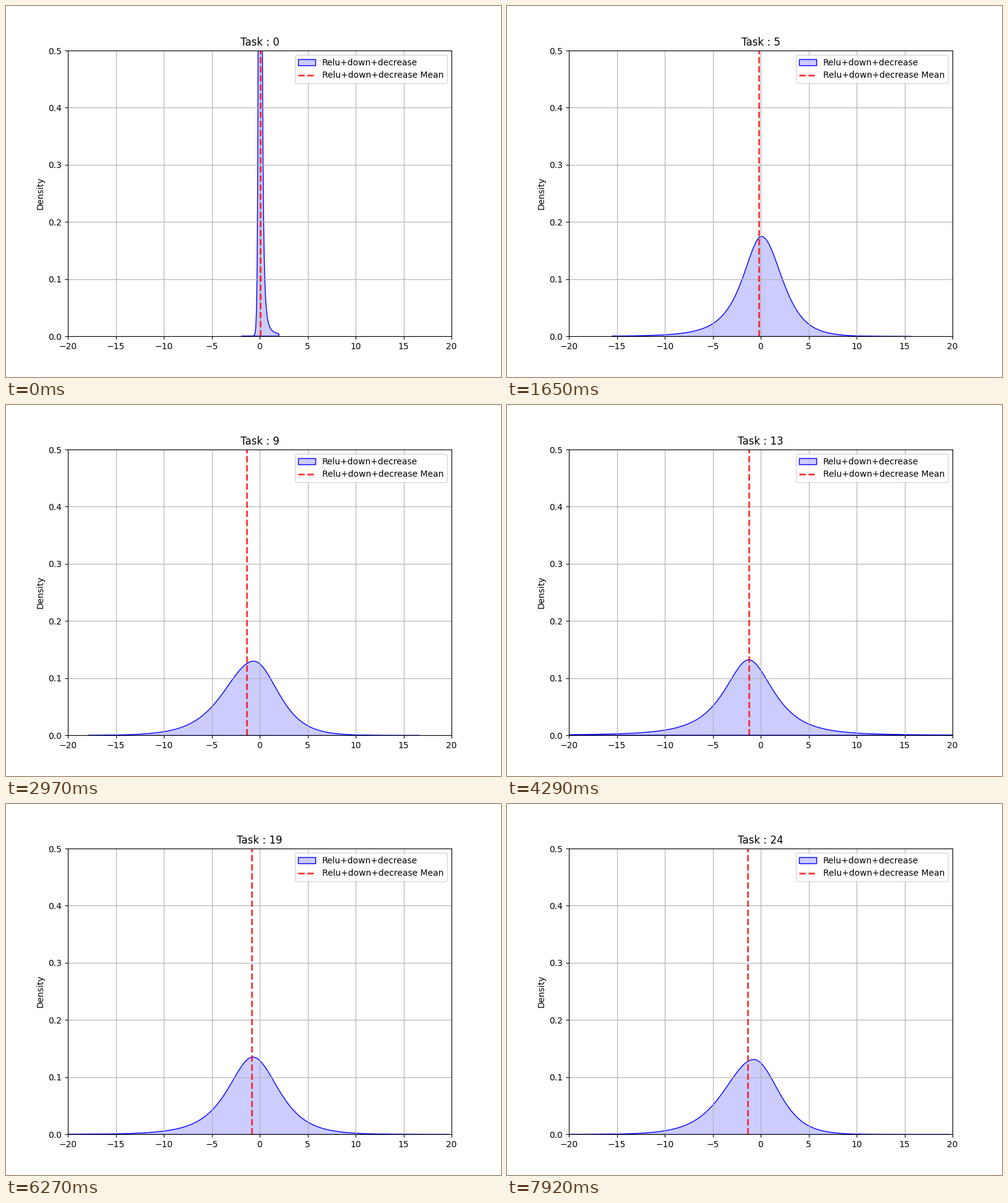
Animation, 800 px wide and 600 px high, one loop 8000 ms. Source, as a matplotlib script:

```python
import numpy as np
import matplotlib.pyplot as plt
from matplotlib.animation import FuncAnimation

LOOP, STEP, HOLD = 8000, 40, 330  # ms
TASKS = 25

# Key shapes by task: mean, mode, 1 / peak height, then width and tail growth
# of the left and the right side, then how far the curve is drawn from its mode.
KEYS = {
    0: (.07, .05, .33, .14, 0, .108, .195, 1.95),
    5: (-.18, .05, 5.71, 2.3, .14, 2.72, .035, 15.6),
    9: (-1.33, -.65, 7.69, 4.0, .035, 3.28, .015, 17.3),
    13: (-1.22, -1.25, 7.58, 2.97, .155, 3.05, .135, 27),
    17: (-1.08, -.65, 6.97, 3.3, .09, 3.3, -.01, 20.5),
    19: (-.83, -.75, 7.38, 3.14, .108, 3.35, .055, 20.5),
    24: (-1.33, -.75, 7.62, 3.95, .033, 3.35, -.01, 20.5),
}


def shape(task):
    """Blend the neighbouring key shapes."""
    return [np.interp(task, list(KEYS), column) for column in zip(*KEYS.values())]


def outline(task):
    """Two-sided sech-squared bell, closed along the baseline."""
    _, mode, flat, left, left_tail, right, right_tail, reach = shape(task)
    d = np.linspace(-reach, reach, 400)
    dist = np.abs(d)
    width = np.where(d < 0, left + left_tail * dist, right + right_tail * dist)
    y = 1 / (flat * np.cosh(dist / width) ** 2)
    x = mode + d
    return np.vstack([[x[0], 0], np.column_stack([x, y]), [x[-1], 0]])


outlines = [outline(k) for k in range(TASKS)]
means = [shape(k)[0] for k in range(TASKS)]

fig, ax = plt.subplots(figsize=(8, 6), dpi=100)
area = ax.fill_between(*outlines[0].T, facecolor=(0, 0, 1, .2), edgecolor=(0, 0, 1, 1),
                       linewidth=1, label="Relu+down+decrease")
mean = ax.axvline(means[0], color="red", alpha=.8, linestyle="--", linewidth=2,
                  label="Relu+down+decrease Mean")
ax.set_xlim(-20, 20)
ax.set_ylim(0, .5)
ax.set_ylabel("Density")
ax.grid(True)
ax.legend(loc="upper right")
title = ax.set_title("Task : 0")


def update(frame):
    task = min((frame * STEP + STEP - 1) // HOLD, TASKS - 1)
    area.set_verts([outlines[task]])
    mean.set_xdata([means[task]] * 2)
    title.set_text(f"Task : {task}")
    return area, mean, title


anim = FuncAnimation(fig, update, frames=LOOP // STEP, interval=STEP,
                     repeat=True, repeat_delay=0)
plt.show()
```
